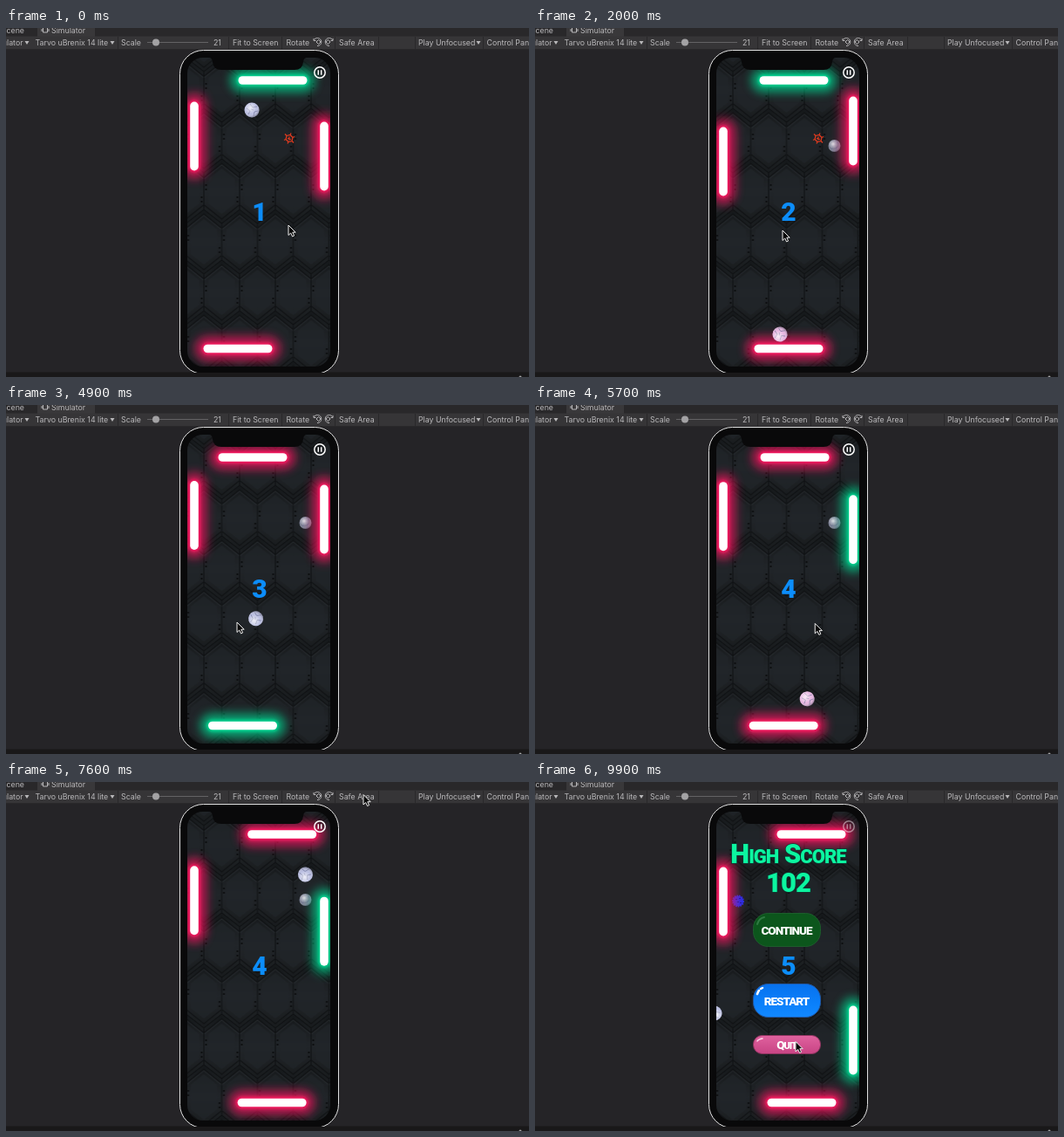
Animation, 600 px wide and 400 px high, one loop 10000 ms. Source, as an HTML page:

```html
<!DOCTYPE html>
<html lang="en">
<head>
<meta charset="utf-8">
<title>Paddle game in a device simulator</title>
<style>
html, body { margin: 0; width: 100%; height: 100%; overflow: hidden; background: #252427; }
svg { display: block; }
.ui { font: 8.8px Inter, sans-serif; fill: #b9b8ba; }
.game { font-family: Roboto, "Liberation Sans", sans-serif; font-weight: 900; letter-spacing: -1px; text-anchor: middle; }
.label { font-size: 13.5px; fill: #fff; }
.title { font-size: 31px; fill: #0cf5a0; stroke: #0b3b33; stroke-width: 1.5; paint-order: stroke; }
.pink { color: #f5155f; }
.green { color: #00cf8c; }
</style>
</head>
<body>
<svg width="600" height="400" viewBox="0 0 600 400">
<defs>
  <linearGradient id="plate" x2="0" y2="1">
    <stop stop-color="#15181a"/><stop offset=".5" stop-color="#212529"/><stop offset="1" stop-color="#181b1d"/>
  </linearGradient>
  <linearGradient id="blue" x2="0" y2="1">
    <stop stop-color="#0872ee"/><stop offset=".6" stop-color="#0a80fb"/><stop offset="1" stop-color="#1288ff"/>
  </linearGradient>
  <linearGradient id="rose" x2="0" y2="1">
    <stop stop-color="#e0629f"/><stop offset="1" stop-color="#c84484"/>
  </linearGradient>
  <radialGradient id="shade" cx=".4" cy=".35" r=".7">
    <stop stop-color="#fff" stop-opacity=".75"/><stop offset=".6" stop-color="#fff" stop-opacity="0"/>
    <stop offset="1" stop-color="#223" stop-opacity=".55"/>
  </radialGradient>
  <filter id="near" x="-50%" y="-150%" width="200%" height="400%"><feGaussianBlur stdDeviation="1.8"/></filter>
  <filter id="far" x="-50%" y="-150%" width="200%" height="400%"><feGaussianBlur stdDeviation="5.5"/></filter>
  <clipPath id="screen"><rect x="208" y="34" width="164" height="354" rx="18"/></clipPath>
  <clipPath id="view"><rect y="24" width="600" height="371"/></clipPath>

  <g id="scale">
    <path d="M0-37 20.5-21V21L0 37-20.5 21V-21z" fill="url(#plate)" stroke="#0d0f11"/>
    <path d="M-20-16 0-32 20-16M-20 16 0 32 20 16" fill="none" stroke="#111315" stroke-width="1.5"/>
    <path d="M-20-14 0-30 20-14" fill="none" stroke="#2a2e32" stroke-width=".7"/>
    <path d="M0-26 15-14V14L0 26-15 14V-14z" fill="#212529" opacity=".7"/>
    <path d="M-18-8v2m0 3v2M18 6v2m0 3v2" stroke="#08090a" stroke-width="1.6"/>
  </g>
  <pattern id="scales" x="247.5" y="92" width="41" height="116" patternUnits="userSpaceOnUse">
    <use href="#scale" x="20.5" y="37"/>
    <use href="#scale" y="95"/><use href="#scale" x="41" y="95"/>
    <use href="#scale" y="-21"/><use href="#scale" x="41" y="-21"/>
  </pattern>

  <g id="paddle">
    <rect x="-49" y="-14" width="98" height="28" rx="14" fill="currentColor" opacity=".72" filter="url(#far)"/>
    <rect x="-41.5" y="-7" width="83" height="14" rx="7" fill="currentColor" filter="url(#near)"/>
    <rect x="-39.5" y="-4.8" width="79" height="9.6" rx="4.8" fill="#fff"/>
  </g>
  <g id="orb">
    <circle r="8.5" fill="currentColor"/>
    <path d="M-6-2-2 1-4 5M-2-7 1-3 6-4M2 7 3 2 7 1M-1-1 2 0" fill="none" stroke="#666b91" stroke-width=".9" opacity=".7"/>
    <circle r="8.5" fill="url(#shade)"/>
  </g>
  <path id="drop" d="M-2.5 0h5L0 4z" fill="#b9b8ba"/>
  <path id="turn" d="M-3.5-2.5A4.5 4.5 0 1 1 0 4.5M-1 0 1.5-2.5 4 0 1.5 2.5zM-4-4v2.5h2.5" fill="none" stroke="#b9b8ba"/>
</defs>

<!-- Editor window -->
<rect width="600" height="10" fill="#29282a"/>
<rect x="36" width="66" height="10" fill="#39383a"/>
<rect y="9.5" width="600" height="14.5" fill="#363537"/>
<path d="M0 24.5H600M128.5 10V24M255.5 10V24M316.5 10V24M377.5 10V24M427.5 10V24M469.5 10V24M547.5 10V24" stroke="#29282a"/>
<g class="ui">
  <text x="21" y="6" text-anchor="end">Scene</text>
  <path d="M42.5 0v5h5V0M41 1v3M49 1v3" fill="none" stroke="#b9b8ba"/>
  <text x="52" y="6">Simulator</text>
  <text x="19.5" y="19.5" text-anchor="end">Simulator</text><use href="#drop" x="24" y="15"/>
  <text x="33.5" y="19.5">Tarvo uBrenix 14 lite</text><use href="#drop" x="122" y="15"/>
  <text x="132" y="19.5">Scale</text>
  <path d="M162 16.5h70" stroke="#636264"/><circle cx="172" cy="16.5" r="4" fill="#a3a2a4"/>
  <text x="238" y="19.5">21</text>
  <text x="260" y="19.5">Fit to Screen</text>
  <text x="321.5" y="19.5">Rotate</text>
  <use href="#turn" x="357" y="16"/><use href="#turn" transform="translate(371 16) scale(-1 1)"/>
  <text x="382" y="19.5">Safe Area</text>
  <text x="473" y="19.5">Play Unfocused</text><use href="#drop" x="542" y="15"/>
  <text x="551.5" y="19.5">Control Panel</text>
</g>
<rect y="394.5" width="600" height="5.5" fill="#191819"/>
<circle cx="590" cy="400" r="1.5" fill="#a3a2a4"/>

<!-- Phone -->
<g clip-path="url(#view)">
  <rect x="199.5" y="25.5" width="182" height="371" rx="27" fill="#09090a" stroke="#e2e2e2"/>
</g>
<g clip-path="url(#screen)">
  <rect x="208" y="34" width="164" height="354" fill="url(#scales)"/>
  <g id="bug" transform="translate(325 126.5)" fill="none" stroke="#e23a1e" stroke-width="1.2">
    <path d="M-3-3 1-4 4-1 3 3-1 4-4 1zM-3-3-5-5M1-4 2-6M4-1 6-2M3 3 5 5M-1 4-2 6M-4 1-6 2M-2 0 2 1M0-2 0 2"/>
  </g>
  <use id="rock" href="#orb" transform="translate(343.5 135) scale(.82)" color="#777c90"/>
  <g id="spark" transform="translate(233 136.5)">
    <circle r="6" fill="#2530e8" stroke="#2530e8" stroke-width="2" stroke-dasharray="1.6 1"/>
    <path d="M-3-2h2m2-1h2m-4 4h2m1 1h2" stroke="#1219a0"/>
  </g>
  <use id="top" href="#paddle"/>
  <use id="bottom" href="#paddle" class="pink"/>
  <use id="left" href="#paddle" class="pink"/>
  <use id="right" href="#paddle"/>
  <text id="score" class="game" x="290.5" y="221" font-size="30" fill="#0c8dfa"></text>
  <g id="pause" transform="translate(360 51)" stroke="#fff" stroke-width="1.5" fill="none">
    <circle r="6.2"/><path d="M-1.7-2.8v5.6M1.7-2.8v5.6"/>
  </g>
  <g id="menu" class="game">
    <text class="title" x="290.5" y="93">H<tspan font-size="22">IGH</tspan> S<tspan font-size="22">CORE</tspan></text>
    <text class="title" x="290.5" y="126">102</text>
    <rect x="250.5" y="150.5" width="77" height="38" rx="17" fill="#0c561c" stroke="#1d5c2c"/>
    <path d="M255 163q2-7 8-8" fill="none" stroke="#2f7a42" stroke-width="2" stroke-linecap="round"/>
    <text class="label" x="288.5" y="175">CONTINUE</text>
    <rect x="250.5" y="231.5" width="77" height="38" rx="17" fill="url(#blue)" stroke="#1f59a8"/>
    <path d="M255 243q1-3 2-4M259 237l2-1" fill="none" stroke="#fff" stroke-width="2.5" stroke-linecap="round"/>
    <text class="label" x="288.5" y="256">RESTART</text>
    <rect x="250.5" y="290.5" width="77" height="21" rx="10" fill="url(#rose)" stroke="#8d345f"/>
    <path d="M255 297q1-2 6-3" fill="none" stroke="#ffd9ec" stroke-width="1.5" stroke-linecap="round"/>
    <text class="label" x="288.5" y="306">Q<tspan font-size="11">UIT</tspan></text>
  </g>
  <use id="ball" href="#orb"/>
</g>
<path d="M231 33q6 1 6 6 1 9 10 9h84q9 0 10-9 0-5 6-6z" fill="#09090a"/>
<path id="cursor" d="M0 0V11.5L2.7 9 4.6 13 6.6 12 4.8 8.2H8.2z" fill="#080808" stroke="#eee" stroke-width="1"/>
</svg>

<script>
const LOOP = 10000, STEP = 100;
const TOP_HIT = 3793, BOTTOM_HIT = 5601, RIGHT_HIT = 7790, MENU = 7900;
const $ = id => document.getElementById(id);

// Each key is [time, value, ...]; values change linearly between keys.
const tracks = {
  ball: [[0, 282, 94], [134, 282, 74], [2013, 281, 353], [3300, 231, 150], [TOP_HIT, 248, 74],
    [BOTTOM_HIT, 311, 353], [6600, 323, 190], [7310, 332, 74], [RIGHT_HIT, 351, 127], [8600, 296, 180], [9900, 206, 265]],
  cursor: [[0, 324, 226], [2000, 284, 232], [3300, 225, 254], [4900, 265, 249], [6600, 384.5, 252],
    [7600, 410, 14.5], [7900, 410, 14.5], [8600, 303, 292], [9900, 299, 297.5]],
  top: [[0, 306], [2000, 297], [3300, 272], [4900, 283], [6600, 315], [RIGHT_HIT, 317]],
  bottom: [[0, 266], [2000, 291], [3300, 275], [4900, 271.5], [6600, 300.5], [RIGHT_HIT, 306]],
  left: [[0, 124], [2000, 153], [3300, 172], [4900, 126.5], [6600, 129], [RIGHT_HIT, 137]],
  right: [[0, 147], [2000, 118], [3300, 107], [4900, 131], [6600, 156], [RIGHT_HIT, 174], [9900, 296]]
};

function at(keys, t) {
  const i = keys.findIndex(k => k[0] > t);
  if (i < 0) return keys[keys.length - 1].slice(1);
  const a = keys[i - 1], b = keys[i], p = (t - a[0]) / (b[0] - a[0]);
  return a.slice(1).map((v, n) => v + (b[n + 1] - v) * p);
}

const place = (id, x, y, turn = 0) => $(id).setAttribute('transform', `translate(${x} ${y}) rotate(${turn})`);
const show = (id, on) => $(id).setAttribute('visibility', on ? 'visible' : 'hidden');
const light = (id, on) => $(id).setAttribute('class', on ? 'green' : 'pink');

function draw(t) {
  const pos = id => at(tracks[id], t);
  const [x, y] = pos('ball');
  place('ball', x, y, t / 8);
  $('ball').setAttribute('color', y > 335 || (x < 240 && t < 5000) ? '#e6b4e0' : '#b9bde0');
  place('cursor', ...pos('cursor'));
  place('top', pos('top')[0], 60);
  place('bottom', pos('bottom')[0], 367.5);
  place('left', 216, pos('left')[0], 90);
  place('right', 365, pos('right')[0], 90);

  light('top', t < TOP_HIT);
  light('bottom', t >= TOP_HIT && t < BOTTOM_HIT);
  light('right', t >= BOTTOM_HIT);
  $('score').textContent = 1 + [134, TOP_HIT, BOTTOM_HIT, RIGHT_HIT].filter(hit => t >= hit).length;

  show('bug', t < 2600);
  show('rock', t >= 1000 && t < RIGHT_HIT);
  show('spark', t >= RIGHT_HIT);
  show('menu', t >= MENU);
  $('pause').setAttribute('opacity', t >= MENU ? 0.45 : 1);
}

const start = performance.now();
function tick() {
  const t = (performance.now() - start) % LOOP;
  draw(Math.floor(t / STEP) * STEP);
  requestAnimationFrame(tick);
}
tick();
</script>
</body>
</html>
```
